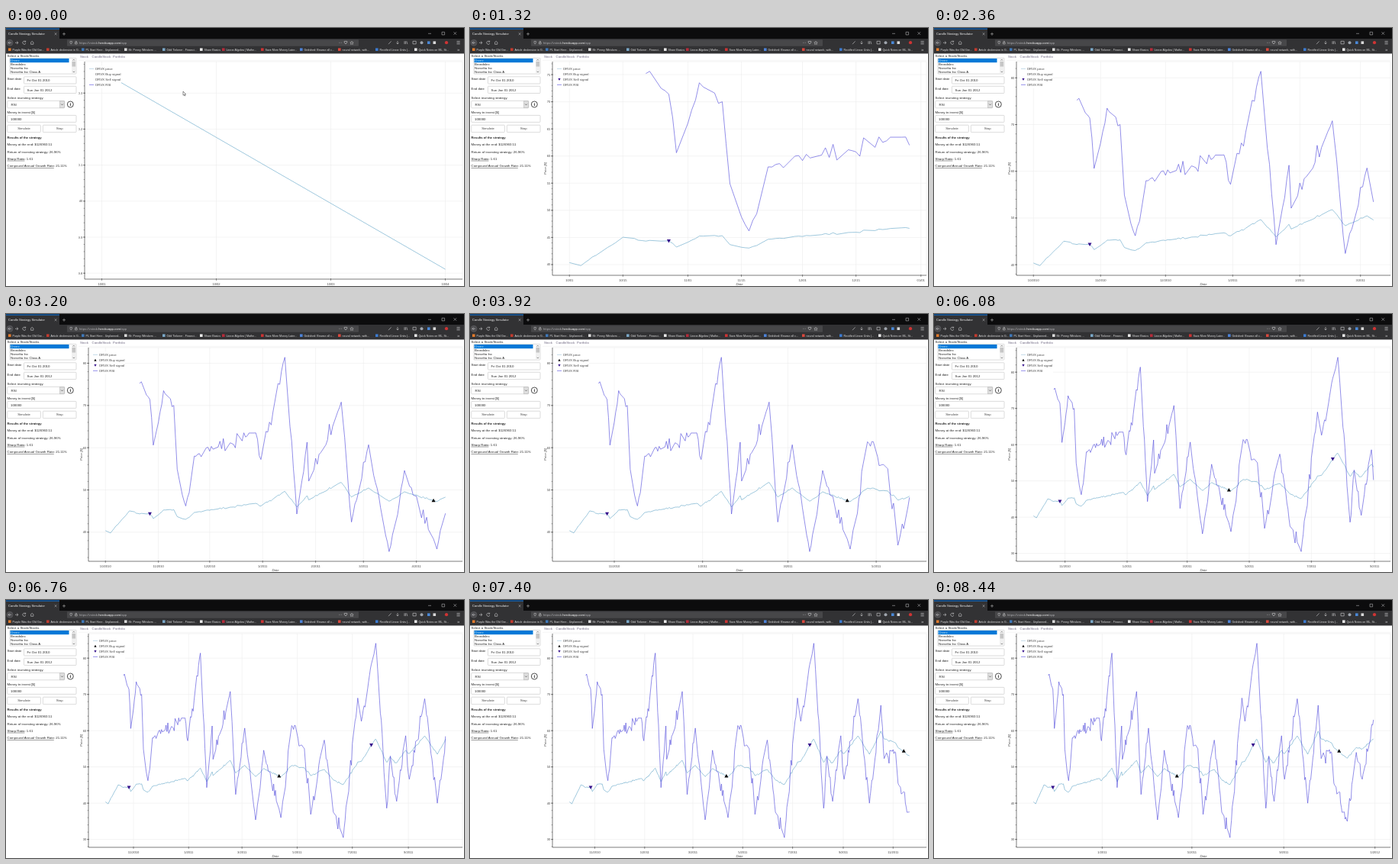
An HTML page that plays this animation: 600x338 px, repeating every 8.48 s.

```html
<!DOCTYPE html>
<html lang="en">
<head>
<meta charset="utf-8">
<title>Strategy chart</title>
<style>
html, body { margin: 0; width: 100%; height: 100%; overflow: hidden; background: #fff; }
svg { display: block; width: 600px; height: 338px; font-family: "Liberation Sans", Arial, sans-serif; font-size: 4.35px; }
text { white-space: pre; }
</style>
</head>
<body>
<svg id="stage" viewBox="0 0 600 338">
  <clipPath id="view"><rect x="95" y="43" width="505" height="295"/></clipPath>
  <g id="page"></g>
  <g id="chart" clip-path="url(#view)"></g>
  <path id="cursor" d="M232 83v5.2l1.2-1 .8 1.8.9-.4-.8-1.7h1.6z" fill="#fff" stroke="#222" stroke-width=".5"/>
</svg>
<script>
const LOOP = 8480, STEP = 40;
const PRICE_COLOR = '#64a6c8', RSI_COLOR = '#5049dc', SELL_COLOR = '#35108c';
const $ = id => document.getElementById(id);

// ---- drawing helpers ----
const attrs = o => Object.entries(o).map(([k, v]) => `${k}="${v}"`).join(' ');
const text = (x, y, s, o = {}) => `<text x="${x}" y="${y}" ${attrs({ fill: '#222', ...o })}>${s}</text>`;
const rect = (x, y, w, h, fill, o = {}) =>
  `<rect x="${x}" y="${y}" width="${w}" height="${h}" fill="${fill}" ${attrs(o)}/>`;
const path = (d, stroke, width = 0.6, o = {}) =>
  `<path d="${d}" fill="none" stroke="${stroke}" stroke-width="${width}" ${attrs(o)}/>`;
const dot = (x, y, r, fill, o = {}) => `<circle cx="${x}" cy="${y}" r="${r}" fill="${fill}" ${attrs(o)}/>`;
const box = (x, y, w, h) => rect(x, y, w, h, '#fff', { stroke: '#c4c4c4', 'stroke-width': 0.6, rx: 0.8 });
const triangle = (x, y, r, up) => {
  const k = up ? 1 : -1;
  return `<path d="M${x} ${y - k * r}L${x + r} ${y + k * r * 0.8}H${x - r}z" fill="${up ? '#000' : SELL_COLOR}"/>`;
};

// ---- browser frame and side panel ----
function browser() {
  const light = '#d0d0d2';
  const marks = [
    [3, '#e07a2c', 'Purple Was the Old Gre...'], [53, '#c23b2e', 'Article declension in G...'],
    [99, '#3f78b8', 'PL Start Here - Unplanned...'], [155, '#d9d9d9', 'Mr. Penny Whiskers ...'],
    [205, '#7aa7c7', 'Odd Tinkerer - Financi...'], [254, '#e8e8e8', 'Share Basics'],
    [283, '#b52b3a', 'Linear Algebra | Mathe...'], [334, '#c33', 'Save More Money Later...'],
    [385, '#4d83d8', 'Gridshed: Browse all c...'], [435, '#d8483d', 'neural network, with...'],
    [484, '#3c7bd0', 'Rectified Linear Units (...'], [535, '#e8e8e8', 'Quick Notes on ML, St...']
  ];
  return rect(0, 0, 600, 14, '#0c0c0d') + rect(0, 1, 70, 13, '#323234') + rect(0, 0.6, 70, 0.9, '#0a84ff') +
    rect(0, 14, 600, 19.5, '#323234') +
    text(3, 9, 'Candle Strategy Simulator', { fill: '#f4f4f4', 'font-size': 4.1 }) +
    path('M63.7 6.3l2.8 2.8m0-2.8l-2.8 2.8M76 5.8v4m-2-2h4', light, 0.5) +
    path('M553 7.3h4M571 5.3h3.6v3.6h-3.6zM586.5 5.2l3.6 3.6m0-3.6l-3.6 3.6', light, 0.5) +
    dot(5, 19.3, 4, '#4a4a4d', { stroke: '#77777a', 'stroke-width': 0.4 }) +
    path('M7 19.3H3m1.8-1.8L3 19.3l1.8 1.8M12 19.3h4m-1.8-1.8l1.8 1.8-1.8 1.8', light) +
    path('M25.6 18a2.1 2.1 0 1 0 .3 2M25.7 16.6v1.6h-1.5M32 19.3l2.2-2 2.2 2m-3.8 0v2h3.2v-2', light) +
    rect(80, 15.2, 382, 8.5, '#474749', { rx: 0.8 }) +
    path('M84 17.4h2.4v1.8l-1.2 1.9-1.2-1.9zM90.5 19h2.6v2h-2.6zm.5 0v-1a.8.8 0 0 1 1.6 0v1', light, 0.5) +
    text(96, 21, 'https://vstrab.<tspan fill="#fff">herokuapp.com</tspan>/app', { fill: '#a9a9ac', 'font-size': 4.2 }) +
    path('M436 19.3h.6m1 0h.6m1 0h.6M453 17.3l.7 1.4 1.5.2-1.1 1 .3 1.5-1.4-.7-1.4.7.3-1.5-1.1-1 1.5-.2z', light, 0.5) +
    path('M443.2 17.4h3.6v1.6l-1.8 2-1.8-2z', light, 0.6) +
    path('M501 21.2l3.6-3.8M513 17v4m-1.5-1.5l1.5 1.5 1.5-1.5M522 17.3v3.8m1.4-3.8v3.8m1.4-3.8l1 3.8M533 17.3h4.2v3.6H533z', light, 0.6) +
    dot(544.5, 19.2, 2, '#9fa5ad') + rect(552, 17.4, 3.6, 3.6, '#4a88d8') + rect(559.5, 17.4, 3.6, 3.6, '#d8d8d8') +
    dot(577, 19.2, 2.1, '#cf3434') +
    path('M590.5 17.4h4.2m-4.2 1.8h4.2m-4.2 1.8h4.2', light) +
    marks.map(([x, c, s]) => rect(x, 26.4, 3.6, 3.6, c) +
      text(x + 5.5, 29.6, s, { fill: '#e2e2e2', 'font-size': 3.65 })).join('') +
    text(591, 29.8, '»', { fill: light, 'font-size': 6 });
}

function panel() {
  const stocks = ['Orvex', 'Brondalex', 'Norvelta Inc', 'Norvelta Inc Class A'];
  const results = ['Money at the end: $126960.51', 'Return of investing strategy: 26.96%',
    '<tspan text-decoration="underline">Sharp Ratio</tspan>: 1.61',
    '<tspan text-decoration="underline">Compound Annual Growth Rate</tspan>: 21.11%'];
  const label = (y, s, o) => text(1.5, y, s, o);
  const dateField = (y, name, value) => label(y, name) + box(23.5, y - 4.4, 68.5, 9.2) + text(27.5, y + 1.8, value);
  const button = (x, s) => box(x, 127.2, 43.6, 9.4) +
    text(x + 21.8, 133.4, s, { 'text-anchor': 'middle', fill: '#444' });
  return label(38.2, 'Select a Stock/Stocks') +
    box(5, 39.3, 87, 20.8) + rect(5.5, 40, 77, 5.2, '#0078d7') +
    stocks.map((s, i) => text(6, 44.1 + i * 5, s, { fill: i ? '#222' : '#cfe6fa' })).join('') +
    rect(86, 39.7, 5.6, 20, '#f0f0f0') + rect(86.5, 44, 4.6, 6.5, '#c6c6c6') +
    path('M87.6 42.5l1.2-1.2 1.2 1.2M87.6 56.8l1.2 1.2 1.2-1.2', '#444') +
    dateField(68.2, 'Start date', 'Fri Oct 01 2010') + dateField(80.7, 'End date', 'Sun Jan 01 2012') +
    label(93.4, 'Select investing strategy') + box(1.8, 95.4, 75, 9.4) + text(6.5, 101.7, 'RSI') +
    rect(70.6, 95.9, 5.8, 8.4, '#dedede', { stroke: '#999', 'stroke-width': 0.4 }) +
    path('M72.2 99.5l1.3 1.4 1.3-1.4', '#333') +
    dot(84.3, 100, 4, '#fff', { stroke: '#222', 'stroke-width': 0.8 }) +
    text(84.3, 102.2, 'i', { 'text-anchor': 'middle', 'font-weight': 700, 'font-size': 6 }) +
    label(112.2, 'Money to invest [$]') + box(1.8, 114.4, 90.2, 9) + text(6, 120.5, '100000') +
    button(1.8, 'Simulate') + button(48.4, 'Stop') +
    label(145.4, 'Results of the strategy', { 'font-weight': 700, 'font-size': 4.2 }) +
    results.map((s, i) => label(154.4 + i * 9.2, s)).join('') +
    ['Stock', 'CandleStock', 'Portfolio'].map((s, i) =>
      text([97, 112.5, 140][i], 39.3, s, { fill: '#6d6680' })).join('') +
    path('M95 42.4H599', '#ececec', 0.5);
}

// ---- series, in days since 1 October 2010 ----
// The turning points of the indicator; the days between get a seeded jitter.
const swings = [
  [0, 55], [3, 48.5], [14, 85], [20, 75.2], [26, 71.4], [28, 60.6], [34, 73.5], [40, 70], [42, 54.9], [47, 46.2],
  [52, 58], [88, 63.5], [91, 57.2], [105, 81.4], [112, 44.3], [118, 61.3], [119, 52.1], [138, 70.8], [144, 42.4],
  [154, 60.7], [166, 35.4], [175, 54.6], [194, 36], [206, 61.4], [220, 55], [227, 36.9], [242, 57.4], [252, 37.5],
  [263, 30.5], [279, 69], [283, 62.6], [299, 84.1], [311, 38.6], [315, 53], [322, 40.5], [332, 58.6], [336, 46.6],
  [353, 68.8], [367, 40], [381, 67], [385, 52.3], [399, 54], [402, 45.5], [420, 35], [432, 54], [440, 46.6], [455, 63]
];
// Slow drift of the price, which also leans towards the indicator.
const drift = [
  [0, 40.36], [20, 41.9], [47, 44.1], [105, 46.5], [137, 49.9], [192, 49.5], [226, 49.8], [262, 48],
  [277, 49.2], [298, 54.2], [320, 52.6], [353, 56.9], [367, 55.3], [381, 58.4], [420, 54.8], [455, 56.8]
];
const pace = [[0, 1], [59, 111], [98, 167], [129, 208], [152, 238], [185, 296], [211, 325]];
const LEAN = 0.12, JITTER = 2.4, FIRST_RSI = 14, TRADES = 325;
const signals = [[26, false], [192, true], [294, false], [409, true]];

function segment(points, x) {
  const i = Math.max(1, points.findIndex(p => p[0] >= x));
  const [a, b] = [points[i - 1], points[i]], p = (x - a[0]) / (b[0] - a[0]);
  return { value: a[1] + (b[1] - a[1]) * p, p };
}
const along = (points, x) => segment(points, x).value;
const noise = n => { const v = Math.sin(n * 127.1) * 43758.5453; return (v - Math.floor(v)) * 2 - 1; };
// Trading days skip weekends; day 0 is a Friday.
const dayOf = n => n + 2 * Math.floor((n + 4) / 5);

const price = [], rsi = [];
for (let n = 0; n <= TRADES; n++) {
  const day = dayOf(n), { value, p } = segment(swings, day);
  const level = value + JITTER * Math.sin(Math.PI * p) * noise(n);
  price.push([day, along(drift, day) + LEAN * (level - 55)]);
  if (n >= FIRST_RSI) rsi.push([day, level]);
}
const priceOn = day => price.find(p => p[0] === day)[1];

// ---- axes ----
const nearest = (gaps, range) =>
  gaps.reduce((best, g) => Math.abs(6 - range / g) < Math.abs(6 - range / best) ? g : best);

function yTicks(lo, hi) {
  const gap = nearest([0.1, 0.2, 0.5, 1, 2, 5, 10], hi - lo), out = [];
  for (let k = Math.ceil(lo / gap); k * gap <= hi; k++) out.push([k * gap, String(+(k * gap).toFixed(2))]);
  return { gap, ticks: out };
}

function xTicks(lo, hi) {
  const gap = nearest([1, 3, 7, 14, 30.4, 60.8, 121.7], hi - lo), out = [];
  const months = Math.round(gap / 30.4), pad = v => String(v).padStart(2, '0');
  const start = Date.UTC(2010, 9, 1);
  for (let d = Math.ceil(lo); d <= hi; d++) {
    const date = new Date(start + d * 864e5), m = date.getUTCMonth(), dom = date.getUTCDate();
    if (gap < 30) {
      if ((dom - 1) % gap === 0 && (gap === 1 || dom + gap <= 32)) out.push([d, `${pad(m + 1)}/${pad(dom)}`]);
    } else if (dom === 1 && m % months === 0) out.push([d, `${m + 1}/${date.getUTCFullYear()}`]);
  }
  return out;
}

function legend(left, day) {
  const rows = ['price', 'Buy signal', 'Sell signal', 'RSI'], x = left + 6;
  const icon = (up, y) => signals.some(s => s[1] === up && s[0] <= day) ? triangle(x + 3, y, 1.6, up) : '';
  return rect(left + 5, 49, 43, 30, '#fff', { opacity: 0.95 }) +
    path(`M${x} 53.4h6`, '#9cc3d8') + path(`M${x} 74.4h6`, RSI_COLOR) + icon(true, 60.4) + icon(false, 67.4) +
    rows.map((s, i) => text(left + 13.7, 55 + i * 7, 'ORVX ' + s, { 'font-size': 4.4, fill: '#444' })).join('');
}

function chart(t) {
  const day = dayOf(Math.round(along(pace, t / STEP))), settled = t >= 200;
  const left = settled ? 108 : 103, right = 598, top = 44, bottom = settled ? 324 : 329;
  const shown = [price, rsi].map(s => s.filter(p => p[0] <= day));
  const values = shown.flat().map(p => p[1]);
  const min = Math.min(...values), max = Math.max(...values), pad = (max - min) * 0.05;
  const x0 = -day * 0.05, x1 = day * 1.05, y0 = min - pad, y1 = max + pad;
  const X = d => +(left + (d - x0) / (x1 - x0) * (right - left)).toFixed(2);
  const Y = v => +(bottom - (v - y0) / (y1 - y0) * (bottom - top)).toFixed(2);
  const line = (s, color) => s.length
    ? path('M' + s.map(p => X(p[0]) + ' ' + Y(p[1])).join('L'), color, 0.62, { 'stroke-linejoin': 'round' }) : '';

  const small = { 'font-size': 4.1, fill: '#444' };
  const { gap, ticks } = yTicks(y0, y1);
  let grid = '', marks = '', labels = '';
  for (const [d, s] of xTicks(x0, x1)) {
    grid += `M${X(d)} ${top}V${bottom}`;
    marks += `M${X(d)} ${bottom - 1}v3`;
    labels += text(X(d), bottom + 7.5, s, { 'text-anchor': 'middle', ...small });
  }
  for (const [v, s] of ticks) {
    grid += `M${left} ${Y(v)}H${right}`;
    marks += `M${left - 2} ${Y(v)}h3`;
    labels += text(left - 2.8, Y(v) + 1.5, s, { 'text-anchor': 'end', ...small });
  }
  for (let k = Math.ceil(y0 / gap * 5); k * gap / 5 <= y1; k++) marks += `M${left - 1.2} ${Y(k * gap / 5)}h1.2`;

  const title = (s, place) =>
    text(0, 0, s, { 'text-anchor': 'middle', 'font-style': 'italic', fill: '#444', transform: place });
  const titles = settled
    ? title('Date', 'translate(353 337)') + title('Price [$]', 'translate(99.5 184) rotate(-90)') : '';

  return path(grid, '#e9e9e9', 0.5) +
    rect(left, top, right - left, bottom - top, 'none', { stroke: '#e3e3e3', 'stroke-width': 0.5 }) +
    line(shown[0], PRICE_COLOR) + line(shown[1], RSI_COLOR) +
    signals.filter(s => s[0] <= day).map(([d, up]) => triangle(X(d), Y(priceOn(d)), 2.5, up)).join('') +
    path(`M${left} ${top}V${bottom}H${right}`, '#333') + path(marks, '#333', 0.5) +
    labels + titles + legend(left, day);
}

// ---- playback ----
$('page').innerHTML = browser() + panel();
const begin = performance.now();
let last = -1;
function tick() {
  const step = Math.floor((performance.now() - begin) % LOOP / STEP);
  if (step !== last) {
    last = step;
    $('chart').innerHTML = chart(step * STEP);
    $('cursor').style.display = step * STEP < 600 ? '' : 'none';
  }
  requestAnimationFrame(tick);
}
tick();
</script>
</body>
</html>
```
